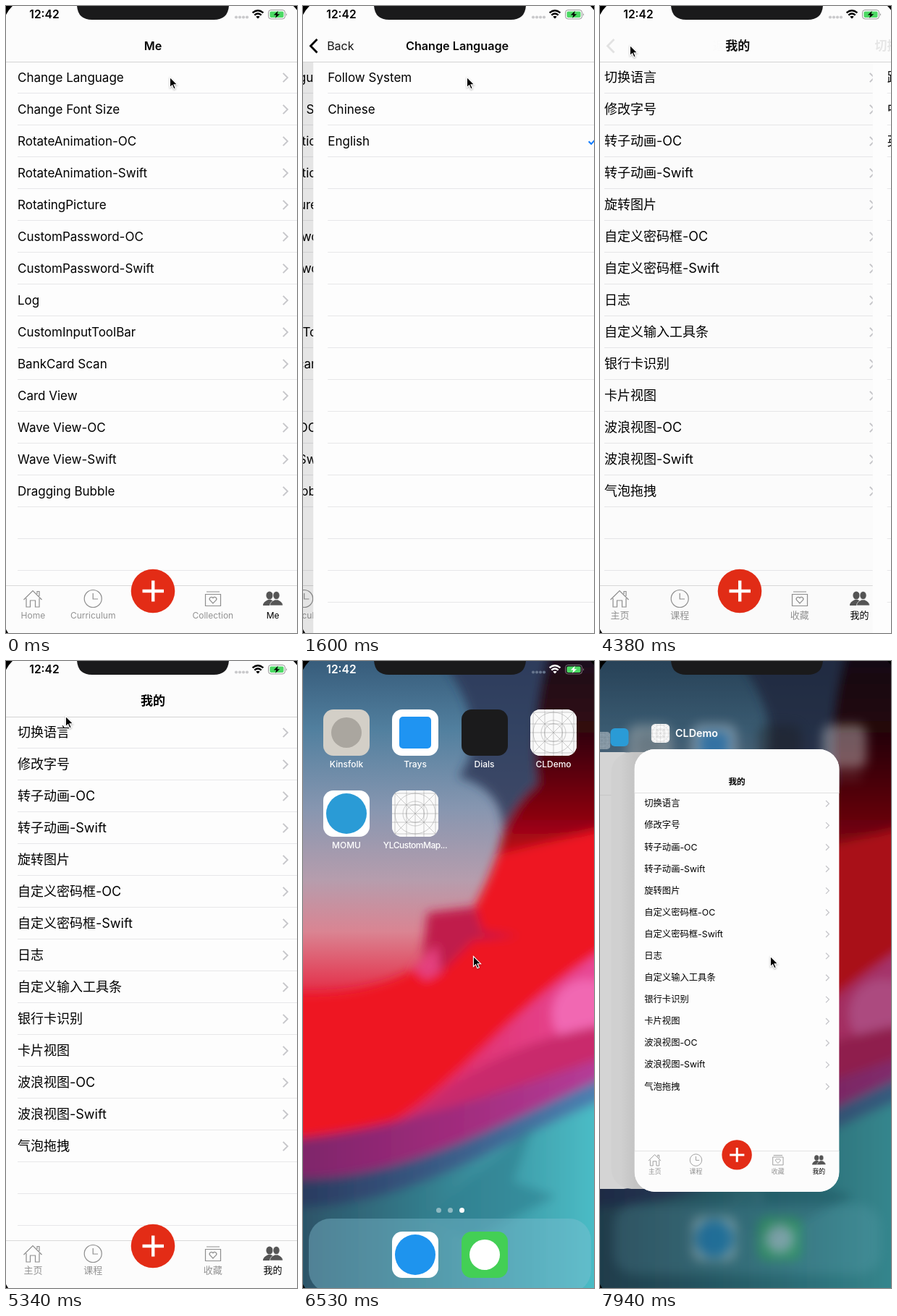
Recreate the animation shown at these times as an HTML page. Size 402 by 867 pixels, loop 8 s.

```html
<!DOCTYPE html>
<html lang="en">
<head>
<meta charset="utf-8">
<title>Language switch</title>
<style>
html, body { margin: 0; width: 100%; height: 100%; overflow: hidden; background: #000; }
body { font-family: Inter, "Noto Sans CJK SC", "Noto Sans CJK", sans-serif; color: #000; }
div, svg { position: absolute; }
svg { overflow: visible; }
#stage { left: 0; top: 0; width: 402px; height: 867px; overflow: hidden; }
#screen { left: -4px; top: -11px; width: 414px; height: 896px; overflow: hidden; }
.fill { left: 0; top: 0; width: 414px; height: 896px; }
.zh .en, .eng .zht { display: none; }

#shell { overflow: hidden; background: #fdfdfd; }
#app, .snap { transform-origin: 0 0; }
.page { background: #fdfdfd; overflow: hidden; }
.row { left: 20px; right: 0; height: 43px; line-height: 44px; border-bottom: 1px solid #e7e7e9; font-size: 17px; white-space: nowrap; }
.row .zht { font-size: 18px; }
.row svg { right: 20px; top: 15px; width: 8px; height: 14px; fill: none; stroke: #c6c6ca; stroke-width: 1.9; }
.hl { left: 0; width: 414px; height: 44px; background: #d9d9d9; opacity: 0; }
.nav { left: 0; top: 0; width: 414px; height: 88px; background: #fcfcfc; border-bottom: 1px solid #d4d4d4; overflow: hidden; }
.title { left: 0; width: 414px; top: 54px; line-height: 24px; text-align: center; font-weight: 600; font-size: 16.2px; }
.title .zht { font-size: 17px; }
#back { left: 31px; top: 54px; line-height: 24px; font-size: 16px; }
.tabs { left: 0; top: 812px; width: 414px; height: 83px; background: #fcfcfc; border-top: 1px solid #d9d9d9; }
.tabs text { font-size: 12px; text-anchor: middle; fill: #939393; }
.tabs text.zht { font-size: 13px; }
.tabs text.on { fill: #000; }
#dim { background: #000; }

#home { transform-origin: 207px 448px; color: #fff; }
.tile { width: 64px; height: 64px; border-radius: 14px; overflow: hidden; }
.tile i { position: absolute; left: 50%; top: 50%; transform: translate(-50%, -50%); }
.label { width: 96px; text-align: center; font-size: 12px; line-height: 16px; font-weight: 500; white-space: nowrap; }
#dock { left: 12px; top: 782px; width: 390px; height: 102px; border-radius: 30px; background: rgba(130, 190, 210, .42); }
#stack { left: 19.5px; top: 11px; }
.card { overflow: hidden; border-radius: 28px; }
.card .row { border-color: transparent; }
</style>
</head>
<body>
<svg width="0" height="0">
  <symbol id="grid" viewBox="0 0 64 64">
    <path fill="#fafafa" d="M0 0H64V64H0Z"/>
    <g fill="none" stroke="#8f8f8f" stroke-width=".45">
      <circle cx="32" cy="32" r="28"/><circle cx="32" cy="32" r="17"/><circle cx="32" cy="32" r="12.5"/>
      <path d="M4 0V64M20 0V64M32 0V64M44 0V64M60 0V64M0 4H64M0 20H64M0 32H64M0 44H64M0 60H64M0 0L64 64M64 0L0 64"/>
    </g>
  </symbol>
</svg>

<div id="stage">
  <div id="screen">
    <svg id="wall" width="414" height="896" viewBox="-4 -11 414 896">
      <defs>
        <linearGradient id="sky" x2="0" y2="1">
          <stop offset="0" stop-color="#345877"/><stop offset=".12" stop-color="#52809f"/>
          <stop offset=".24" stop-color="#8796b0"/><stop offset=".35" stop-color="#b69dad"/>
          <stop offset=".43" stop-color="#da8492"/><stop offset=".52" stop-color="#e4304a"/>
        </linearGradient>
        <linearGradient id="night" x2="0" y2="1">
          <stop offset="0" stop-color="#17131f"/><stop offset=".4" stop-color="#33060f"/>
          <stop offset=".75" stop-color="#8c0311"/><stop offset="1" stop-color="#e01020"/>
        </linearGradient>
        <linearGradient id="rose"><stop offset="0" stop-color="#d81f50"/><stop offset="1" stop-color="#e94c9d"/></linearGradient>
        <linearGradient id="plum"><stop offset="0" stop-color="#7a2468"/><stop offset=".5" stop-color="#a02b7c"/><stop offset="1" stop-color="#b83f9c"/></linearGradient>
        <linearGradient id="navy"><stop offset="0" stop-color="#27365a"/><stop offset="1" stop-color="#4f86b8"/></linearGradient>
        <linearGradient id="teal"><stop offset="0" stop-color="#2b4d62"/><stop offset=".45" stop-color="#34808f"/><stop offset="1" stop-color="#4ec6cf"/></linearGradient>
        <filter id="soft" x="-10%" y="-10%" width="120%" height="120%"><feGaussianBlur stdDeviation="7"/></filter>
      </defs>
      <path fill="url(#sky)" d="M-4-11H410V885H-4Z"/>
      <g filter="url(#soft)">
        <path fill="#2b3654" opacity=".8" d="M170-30H440V120L275 250Q285 180 215 160Q270 90 170-30Z"/>
        <path fill="url(#night)" d="M345-30H440V300H265Q270 215 325 170Q310 80 345-30Z"/>
        <path fill="#ee1424" d="M-30 458C110 470 190 420 232 350Q258 300 268 268L440 225V640L-30 730Z"/>
        <path fill="#c01c4c" d="M172 348L238 340L248 374L300 380L235 386L185 436L165 410Z"/>
        <path fill="#e4417e" d="M152 425L185 392L190 430L170 442Z"/>
        <path fill="url(#rose)" d="M60 670C210 610 270 480 440 385V580C290 610 190 650 60 700Z"/>
        <ellipse cx="392" cy="488" rx="48" ry="48" fill="#f168b2"/>
        <path fill="#c92a6c" d="M70 690C190 590 280 520 440 500V570Z"/>
        <path fill="url(#plum)" d="M-30 662C120 650 260 600 440 540V620C270 640 150 730-30 735Z"/>
        <path fill="url(#navy)" d="M-30 715C130 725 270 640 440 565V660L100 800H-30Z"/>
        <path fill="url(#teal)" d="M-30 755C150 765 290 650 440 598V910H-30Z"/>
        <path fill="#2f7f90" opacity=".6" d="M170 770L320 640L290 720L350 740L230 800Z"/>
      </g>
    </svg>
    <div id="home" class="fill"></div>
    <div id="stack"></div>

    <div id="shell">
      <div id="app" class="fill">
        <div id="me" class="page fill"></div>
        <div id="dim" class="fill"></div>
        <div id="lang" class="page fill"></div>
        <div class="nav">
          <div id="meTitle" class="title"></div>
          <div id="langTitle" class="title"></div>
          <svg id="chev" width="414" height="88" viewBox="-4 -11 414 88"><path d="M19.5 46L10.5 55.2L19.5 64.5" fill="none" stroke="#000" stroke-width="2.8"/></svg>
          <div id="back"></div>
        </div>
      </div>
      <svg id="face"><use href="#grid"/></svg>
      <div id="block" style="left:20%;width:59%;bottom:0;background:linear-gradient(90deg,#b4b4b4 8%,#949497 8% 90%,#b4b4b4 90%)"></div>
    </div>

    <svg id="status" width="414" height="40" viewBox="-4 -11 414 40" fill="currentColor">
      <text x="53" y="17.4" text-anchor="middle" font-size="15.6" font-weight="600">12:42</text>
      <g id="dots"><circle cx="318" cy="15.5" r="2.1"/><circle cx="323" cy="15.5" r="2.1"/><circle cx="328" cy="15.5" r="2.1"/><circle cx="333" cy="15.5" r="2.1"/></g>
      <g fill="none" stroke="currentColor" stroke-width="2.4"><path d="M340.6 9.4Q348 3.2 355.4 9.4M343.3 12.6Q348 8.6 352.7 12.6"/></g>
      <path d="M348 17.6L345.3 14.8Q348 12.6 350.7 14.8Z"/>
      <rect x="362.5" y="5.5" width="23" height="12.4" rx="3.6" fill="none" stroke="currentColor" stroke-opacity=".4"/>
      <rect x="364.4" y="7.4" width="19.2" height="8.6" rx="2" fill="#4cd964"/>
      <path d="M375.8 6.8L369.8 12.4H373.4L372 16.8L378.2 11.2H374.6Z"/>
      <path d="M387 9.6Q388.8 11.7 387 13.8Z" opacity=".5"/>
    </svg>
    <svg width="414" height="896" viewBox="0 0 414 896">
      <path fill-rule="evenodd" d="M0 0H414V896H0ZM41 0A41 41 0 0 0 0 41V855A41 41 0 0 0 41 896H373A41 41 0 0 0 414 855V41A41 41 0 0 0 373 0Z"/>
      <path fill="#1a1a1b" d="M102 0V10Q103 30 123 30H291Q311 30 312 10V0Z"/>
    </svg>
  </div>
  <svg id="cursor" width="14" height="19" style="left:0;top:0;filter:drop-shadow(0 1px 1px rgba(0,0,0,.3))">
    <path d="M.4 .3V14.6L3.6 11.6L5.9 16.8L8.3 15.8L6 10.7H10.6Z" stroke="#fff" stroke-width="1.1"/>
  </svg>
</div>

<script>
const $ = id => document.getElementById(id);
const both = (en, zh) => `<span class="en">${en}</span><span class="zht">${zh}</span>`;
const clamp = x => Math.min(1, Math.max(0, x));

const topics = [
  ['Change Language', '切换语言'], ['Change Font Size', '修改字号'], ['RotateAnimation-OC', '转子动画-OC'],
  ['RotateAnimation-Swift', '转子动画-Swift'], ['RotatingPicture', '旋转图片'], ['CustomPassword-OC', '自定义密码框-OC'],
  ['CustomPassword-Swift', '自定义密码框-Swift'], ['Log', '日志'], ['CustomInputToolBar', '自定义输入工具条'],
  ['BankCard Scan', '银行卡识别'], ['Card View', '卡片视图'], ['Wave View-OC', '波浪视图-OC'],
  ['Wave View-Swift', '波浪视图-Swift'], ['Dragging Bubble', '气泡拖拽']
];
const choices = [['Follow System', '跟随系统'], ['Chinese', '中文'], ['English', '英文']];
const arrow = '<svg viewBox="0 0 8 14"><path d="M.8 .8L7 7L.8 13.2"/></svg>';

const rows = (list, count, extra) => Array.from({ length: count }, (_, i) =>
  `<div class="row" style="top:${88 + 44 * i}px">${list[i] ? both(...list[i]) + extra : ''}</div>`).join('');

function tabBar() {
  const names = [['Home', '主页'], ['Curriculum', '课程'], null, ['Collection', '收藏'], ['Me', '我的']];
  const labels = names.map((n, i) => n ? ['en', 'zht'].map((c, k) =>
    `<text class="${c}${i == 4 ? ' on' : ''}" x="${37.4 + 82.8 * i}" y="${846.6 + k * .4}">${n[k]}</text>`).join('') : '').join('');
  const person = x => `<ellipse cx="${x}" cy="815" rx="4.6" ry="5.6"/><path d="M${x - 9} 829Q${x - 9} 824 ${x - 2} 821H${x + 2}Q${x + 9} 824 ${x + 9} 829Z"/>`;
  return `<div class="tabs"><svg width="414" height="84" style="left:0;top:-1px" viewBox="-4 801 414 84">
    <g fill="none" stroke="#8e8e8e" stroke-width="1.2">
      <path d="M24.5 821L37 808.5L49.5 821M28 819V831H33.5V822H40.5V831H46V819M43 813V809.5H46V816"/>
      <circle cx="120.2" cy="819.5" r="12"/><path d="M120.2 812V820H127"/>
      <path d="M275.5 813.5H296.5V829.5H275.5ZM277 810H295"/>
      <path d="M286 826L281.6 821.4A2.6 2.6 0 0 1 286 818.6A2.6 2.6 0 0 1 290.4 821.4Z"/>
    </g>
    <g fill="#555">${person(364)}</g><g fill="#555" stroke="#fcfcfc" stroke-width=".7">${person(373.5)}</g>
    <circle cx="203" cy="809" r="30.3" fill="#e32c16"/>
    <path d="M188.5 809H218M203.2 794.5V823.5" stroke="#fff" stroke-width="4.4"/>${labels}</svg></div>`;
}
const mePage = () => '<div class="hl" style="top:88px"></div>' + rows(topics, 16, arrow) + tabBar();

$('me').innerHTML = mePage();
$('lang').innerHTML = '<div class="hl" style="top:132px"></div>' + rows(choices, 18, '') +
  '<svg id="check" width="14" height="12" style="left:379px"><path d="M1.5 6.2L5 9.8L12.4 1.6" fill="none" stroke="#0a7aff" stroke-width="2"/></svg>';
$('meTitle').innerHTML = both('Me', '我的');
$('langTitle').innerHTML = both(...topics[0]);
$('back').innerHTML = both('Back', '返回');
const rowGlow = $('me').querySelector('.hl'), choiceGlow = $('lang').querySelector('.hl');

const gridIcon = '<svg width="100%" height="100%"><use href="#grid"/></svg>';
const shape = (size, color, radius) => `<i style="width:${size}px;height:${size}px;background:${color};border-radius:${radius}"></i>`;
const icons = [
  [60, 99, '#d3cfc7', shape(42, '#aaa69f', '50%'), 'Kinsfolk'],
  [155, 99, '#fff', shape(44, '#1f94f2', '5px'), 'Trays'],
  [250.5, 99, '#1b1b1c', '', 'Dials'],
  [346, 99, '#fafafa', gridIcon, 'CLDemo'],
  [60, 211, '#fff', shape(56, '#2a9bd6', '50%'), 'MOMU'],
  [155, 211, '#fafafa', gridIcon, '<span style="letter-spacing:-.5px">YLCustomMap...</span>'],
  [155, 821, '#fff', shape(56, '#1e94ee', '50%'), ''],
  [251, 821, '#43cf55', shape(42, '#fff', '50%'), '']
];
$('home').innerHTML = '<div id="dock"></div>' + icons.map(([x, y, color, inner, name], i) =>
  `<div class="tile" id="tile${i}" style="left:${x - 28}px;top:${y - 21}px;background:${color}">${inner}</div>
   <div class="label" style="left:${x - 44}px;top:${y + 47}px">${name}</div>`).join('') +
  [187, 203, 219].map((x, i) => `<div style="left:${x + .5}px;top:767px;width:7px;height:7px;border-radius:50%;background:rgba(255,255,255,${i == 2 ? 1 : .45})"></div>`).join('');

const box = (x, y, w, h, css, inner = '') => `<div style="left:${x}px;top:${y}px;width:${w}px;height:${h}px;${css}">${inner}</div>`;
$('stack').innerHTML =
  box(-60, 126, 120, 604, 'background:#d4d4d4;border-radius:28px') +
  box(-60, 185, 90, 1, 'background:#c6c6c6') +
  box(15, 126, 200, 604, 'border-radius:28px;background:linear-gradient(90deg,#d0d0d0 6%,#c4c4c4 16%)') +
  box(-10, 98, 24, 24, 'border-radius:5px;overflow:hidden;opacity:.4', gridIcon) +
  box(14, 93, 25, 25, 'border-radius:6px;background:#2a9bd6') +
  box(70, 87, 26, 26, 'border-radius:6px;overflow:hidden', gridIcon) +
  box(104, 90, 90, 20, 'font:600 14.3px/20px Inter,sans-serif;color:#fff', 'CLDemo') +
  `<div class="card zh" style="left:47px;top:122px;width:283px;height:612px"><div class="snap fill" style="transform:scale(.684)">
   <div class="page fill">${mePage()}</div><div class="nav"><div class="title">${both('Me', '我的')}</div></div></div></div>`;

const run = (from, to, n) => Array.from({ length: n }, (_, i) => from + (to - from) * i / (n - 1));
const beats = [0, 1310, 1380, 1490, 1600, 1710, 1830, 1900, 1990, 2090, 2150, 2210, 2810, 2870, 2960,
  ...run(3440, 4030, 11), 4170, 4270, 4380, 4500, ...run(4590, 4930, 5), ...run(4990, 5340, 7),
  6030, 6110, 6230, 6330, 6430, 6530, 7710, 7830, 7940];
const snap = t => beats.filter(b => b <= t).pop();

// Critically damped spring from 0 to 1.
function spring(t, start, speed = 20) {
  const x = Math.max(0, t - start) / 1000 * speed;
  const p = 1 - (1 + x) * Math.exp(-x);
  return p > .998 ? 1 : p;
}

const path = [[0, 226, 98], [1710, 226, 98], [2090, 161, 138], [2210, 160, 140], [3400, 160, 140], [3990, 41, 54],
  [4500, 41, 54], [4930, 59, 69], [5340, 82, 76], [6000, 82, 76], [6110, 96, 86], [6200, 96, 86], [6530, 235, 408], [8000, 235, 408]];
function pointer(t) {
  const i = path.findIndex((p, k) => k && t <= p[0]);
  const [a, b] = [path[i - 1], path[i]];
  const k = (t - a[0]) / (b[0] - a[0]), e = k * k * (3 - 2 * k);
  return [a[1] + (b[1] - a[1]) * e, a[2] + (b[2] - a[2]) * e];
}

const shift = (id, x, opacity = 1) => {
  $(id).style.transform = `translateX(${x}px)`;
  $(id).style.opacity = opacity;
};

function drawApp(t) {
  const q = t < 4170 ? spring(t, 1355) : 1 - spring(t, 4172);
  const zh = t >= 2870;
  $('app').className = 'fill ' + (zh ? 'zh' : 'eng');
  shift('me', -124 * q);
  shift('lang', 414 * (1 - q));
  $('dim').style.opacity = .1 * q;
  shift('meTitle', -158 * q, 1 - q);
  shift('langTitle', 229 * (1 - q), q);
  const press = t >= 4000 && t < 4170 ? .3 : 1;
  shift('back', 140 * (1 - q), q * q * press);
  shift('chev', 0, Math.min(1, q * 1.2) * press);
  $('check').style.top = (zh ? 148 : 192) + 'px';
  rowGlow.style.opacity = t < 1310 ? 0 : clamp((1560 - t) / 200);
  choiceGlow.style.opacity = t < 2810 ? 0 : clamp((2960 - t) / 150);
}

function drawShell(t) {
  const p = t < 6030 ? 0 : spring(t, 5992, 28), r = 1 - p;
  const open = r > .02, s = $('shell').style;
  const w = 64 + 350 * r, h = 64 + 832 * Math.pow(r, 1.3);
  const cx = 350 - 143 * r, cy = 110 + 338 * r;
  s.display = open ? '' : 'none';
  s.left = cx - w / 2 + 'px'; s.top = cy - h / 2 + 'px';
  s.width = w + 'px'; s.height = h + 'px';
  s.borderRadius = p ? 14 + 27 * r + 'px' : 0;
  const seen = clamp((r - .2) / .5);
  $('app').style.transform = `scale(${w / 414})`;
  $('app').style.opacity = seen;
  $('face').style.cssText = `left:0;top:0;width:${w}px;height:${w}px;opacity:${1 - seen}`;
  $('block').style.height = Math.max(0, h - w + 2) + 'px';
  $('block').style.opacity = 1 - seen;
  $('tile3').style.visibility = open ? 'hidden' : '';
  return r;
}

function drawHome(r, s) {
  const k = Math.max(Math.min(r / .157, 2.5), s);
  $('home').style.transform = `scale(${1 - .06 * k})`;
  $('home').style.filter = k > .1 ? `blur(${4 * Math.min(k, 1) + 4 * s}px)` : 'none';
  $('home').style.opacity = 1 - .65 * s;
  $('wall').style.filter = `brightness(${1 - .05 * Math.min(k, 1) - .25 * s})`;
  $('stack').style.display = s ? '' : 'none';
  $('stack').style.transform = `translateX(${383 * (s - 1)}px)`;
  $('status').style.color = r > .5 ? '#000' : '#fff';
  $('status').style.opacity = clamp(1 - (r > .5 ? 0 : r * 1.3) - s * 1.1);
  $('dots').setAttribute('fill', r > .5 ? '#c9c9cb' : '#66748c');
}

function draw() {
  const t = snap(performance.now() % 8000);
  drawApp(t);
  const r = drawShell(t);
  drawHome(r, t < 7710 ? 0 : spring(t, 7690));
  const [x, y] = pointer(t);
  $('cursor').style.transform = `translate(${x}px, ${y}px)`;
  requestAnimationFrame(draw);
}
draw();
</script>
</body>
</html>
```
